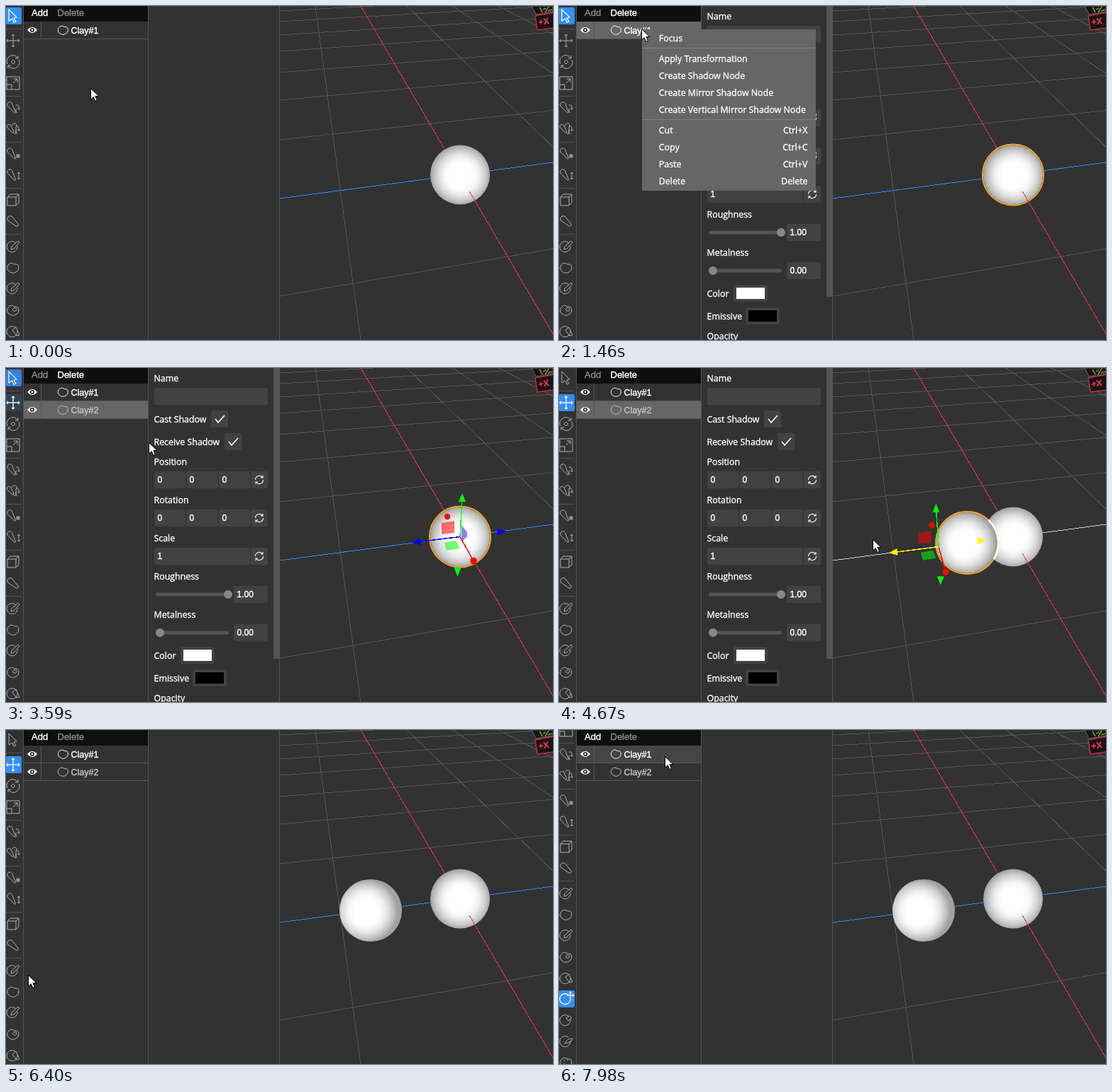
An HTML page that plays this animation: 771 px wide and 472 px high, repeating every 8 s.

```html
<!DOCTYPE html>
<html lang="en">
<head>
<meta charset="utf-8">
<title>Clay editor</title>
<style>
  html, body { margin: 0; width: 100%; height: 100%; overflow: hidden; background: #323232; }
  svg { display: block; width: 771px; height: 472px; }
  line { shape-rendering: crispEdges; }
  text { fill: #fff; font: 12.4px "Open Sans", "Noto Sans", sans-serif; stroke: #fff; stroke-width: .35; }
  .ui { font: 13px "Liberation Sans", Arial, sans-serif; stroke-width: .4; }
  .num { font: 12px "Liberation Sans", Arial, sans-serif; stroke-width: .4; }
  .dim { fill: #888; stroke: #888; }
  .soft { fill: #c4c4c4; stroke: #c4c4c4; }
  .line { fill: none; stroke: #b0b0b0; stroke-width: 1; }
  .white { fill: none; stroke: #fff; stroke-width: 1.1; }
</style>
</head>
<body>
<svg id="stage" viewBox="0 0 771 472"></svg>
<script>
const LOOP = 8000;
const stage = document.getElementById('stage');

// ---------- drawing helpers ----------
const rect = (x, y, w, h, fill, extra = '') =>
  `<rect x="${x}" y="${y}" width="${w}" height="${h}" fill="${fill}" ${extra}/>`;
const seg = (x1, y1, x2, y2, color, extra = '') =>
  `<line x1="${x1}" y1="${y1}" x2="${x2}" y2="${y2}" stroke="${color}" ${extra}/>`;
const text = (x, y, s, cls = '', extra = '') => `<text x="${x}" y="${y}" class="${cls}" ${extra}>${s}</text>`;
const path = (d, cls = 'line', extra = '') => `<path d="${d}" class="${cls}" ${extra}/>`;
const at = (x, y, body, extra = '') => `<g transform="translate(${x} ${y})" ${extra}>${body}</g>`;
const group = (id, body, extra = '') => `<g id="${id}" ${extra}>${body}</g>`;
const field = (x, y, w, value = '') =>
  rect(x, y, w, 24, '#424242', 'rx="2"') + text(x + 4.5, y + 16, value, 'num');

// ---------- toolbar ----------
const PIN = 'M-6.8-1.6A3.7 3.7 0 1 1-.8-4.6L3.6 6.6L2.2 7.4Z';
const DISC = 'M3.5-5.5A7.5 7.5 0 1 0 6-1';
const CLAY = 'M2-5Q-3-9-7-4Q-10 1-6 5Q-1 9 4 6Q8 4 8 0Q8-6 2-5Z';
const PEN = 'M-3 4L-2 0L7-8L9-6L1 3Z';
const MOVE = 'M-9 0H9M0-9V9M-7-2L-9 0L-7 2M7-2L9 0L7 2M-2-7L0-9L2-7M-2 7L0 9L2 7';
const TURN = 'M4-4Q9-5 8 2M6 .5L8 2.5L10 .5M6 7Q3 6 4 1';
const SHIFT = DISC + 'M6-10V0M1-5H11M4.5-8.5L6-10L7.5-8.5M9.5-6.5L11-5L9.5-3.5';
const ICONS = [
  [14, 'M-6-9L5 2L1 3L4 8L1 9L-1 4L-6 7Z'],
  [49, MOVE],
  [79, 'M-8 3A8.5 8.5 0 0 1 4-8L7-5M8-3A8.5 8.5 0 0 1-4 8L-7 5M7-9V-5H3M-7 9V5H-3M0-3L3 0L0 3L-3 0Z'],
  [109, 'M-9-9H9V9H-9ZM-9 2H-2V9M0 0L6-6M1-6H6V-1'],
  [144, PIN + TURN],
  [174, 'M-7-1A3 3 0 1 1-3-5L1 4Q0 6-2 4ZM-1-5A3 3 0 1 1 4-3L4 6Q2 8 1 5' + TURN],
  [209, PIN + 'M5 1H9V5H5ZM5 1L9 5M9 1L5 5'],
  [239, PIN + 'M8-4V6M6-2L8-4L10-2M6 4L8 6L10 4'],
  [274, 'M-8-4H4V8H-8ZM-8-4L-4-8H8V4L4 8M4-4L8-8'],
  [304, 'M-8-4Q-7-8-2-7L7 4Q8 8 4 7L-6 0Q-9-1-8-4Z'],
  [340, DISC + PEN],
  [370, CLAY],
  [399, DISC + PEN],
  [430, CLAY + 'M-1-1Q2-5 5-2Q5 2 1 1Z'],
  [460, DISC + 'M-1-2L4-6L9 5L5 6Z'],
  [489, SHIFT],
  [519, DISC + 'M0-3L5-6L8-3L3 1Z'],
  [549, DISC + 'M-2 3Q1-4 9-4Q8 2-2 3'],
  [579, CLAY + 'M-4-3H-2M1-4H3M-4 2H-2']
];
const button = (id, y) => rect(0, y - 12, 22, 24, '#3390ff', `rx="2" id="${id}"`);
const toolbar = group('tools',
  button('btnSelect', 14) + button('btnMove', 49) + button('btnShift', 489) +
  [32, 127, 192, 257, 322].map(y => seg(0, y + .5, 22, y + .5, '#555')).join('') +
  ICONS.map(([y, d]) => at(10, y, path(d))).join('') +
  group('litSelect', at(10, 14, path(ICONS[0][1], 'white'))) +
  group('litMove', at(10, 49, path(MOVE, 'white'))) +
  group('litShift', at(10, 489, path(SHIFT, 'white'))));

// ---------- node tree ----------
const eye = path('M-7 0Q0-8 7 0Q0 8-7 0Z', '', 'fill="#fff"') +
  '<circle r="3" fill="#222"/><circle r="1.4" fill="#fff"/>';
const row = (y, name, cls) =>
  at(37, y, eye) + at(80.5, y, path(CLAY, 'white',
    `transform="scale(.87)" ${cls ? 'style="stroke:#c4c4c4"' : ''}`)) +
  text(91.5, y + 4.5, name, 'ui ' + cls, 'style="font-size:12.5px"') +
  seg(49.5, y - 12, 49.5, y + 12, '#555') + seg(25, y + 12.5, 200, y + 12.5, '#555');
const tree =
  rect(25, 0, 175, 22, '#0f0f0f') +
  text(36, 14, 'Add', 'ui', 'id="add"') + text(72.5, 14, 'Delete', 'ui', 'id="del"') +
  rect(25, 22, 175, 24, '#454545', 'id="hover1"') +
  rect(25, 22, 175, 24, '#666', 'id="sel1"') + rect(25, 47, 175, 24, '#666', 'id="sel2"') +
  row(34, 'Clay#1', '') + group('row2', row(59, 'Clay#2', 'soft'));

// ---------- properties ----------
const reload = path('M-5.5 0A5.5 5.5 0 0 1 4.5-3.2M5.5 0A5.5 5.5 0 0 1-4.5 3.2M5-6V-3H2M-5 6V3H-2', 'white');
const reset = y => field(345, y, 24) + at(357, y + 12, reload);
const vector = y => [[209, 44], [254, 45], [300, 44]].map(([x, w]) => field(x, y, w, '0')).join('') + reset(y);
const check = (x, y) => field(x, y, 24) + path(`M${x + 6} ${y + 12}l4 5l9-10`, 'white', 'style="stroke-width:1.5"');
const slider = (y, knob, value) =>
  rect(211, y - 2.5, 103, 5, '#555', 'rx="2.5"') + `<circle cx="${knob}" cy="${y}" r="6" fill="#888"/>` +
  field(321, y - 12, 48, value);
const swatch = (x, y, color) => field(x, y, 48) + rect(x + 4, y + 4, 40, 16, color);
const labels = { Name: 14, 'Cast Shadow': 72, 'Receive Shadow': 104, Position: 132, Rotation: 186, Scale: 240,
  Roughness: 294, Metalness: 348, Color: 406, Emissive: 438, Opacity: 466 };
const props = group('props',
  Object.entries(labels).map(([s, y]) => text(208.5, y + 4.5, s)).join('') +
  field(209, 28, 160) + check(289, 60) + check(308, 92) + vector(146) + vector(200) +
  field(209, 254, 135, '1') + reset(254) + slider(320, 313, '1.00') + slider(374, 217, '0.00') +
  swatch(246, 394, '#fff') + swatch(263, 426, '#000') + rect(377, 0, 8, 411, '#555'));

// ---------- context menu ----------
const MENU = [[46, 'Focus'], [75, 'Apply Transformation'], [99, 'Create Shadow Node'],
  [123, 'Create Mirror Shadow Node'], [147, 'Create Vertical Mirror Shadow Node'],
  [176, 'Cut', 'Ctrl+X'], [200, 'Copy', 'Ctrl+C'], [224, 'Paste', 'Ctrl+V'], [248, 'Delete', 'Delete']];
const menu = group('menu',
  rect(117, 33, 245, 228, '#666') +
  [59.5, 160.5].map(y => seg(117, y, 362, y, '#808080')).join('') +
  MENU.map(([y, s, key]) => text(140.8, y + 4.2, s) +
    (key ? text(350.5, y + 4.2, key, '', 'text-anchor="end"') : '')).join(''));

// ---------- viewport ----------
const rows3d = [410, 189, 133, 94, 64, 41, 22, 7].map(y =>
  seg(386, y, 771, y + 385 * (-.1325 - .0003 * (y - 272)), '#555')).join('');
const cols3d = [0, 2, 3, 4, 5].map(n => {
  const k = .1356 + .449 * n;
  return seg(416.5 + 143.7 * k, 0, 416.5 + 615.7 * k, 472, '#555');
}).join('');
// Flat shading bands, darker toward the rim.
const BANDS = 11;
const ball = id => {
  let stops = '';
  for (let i = 0; i < BANDS; i++) {
    const from = i ? .4 + .6 * ((i - 1) / (BANDS - 1)) ** .85 : 0;
    const to = .4 + .6 * (i / (BANDS - 1)) ** .85;
    const v = Math.round(254 - 92 * (i / (BANDS - 1)) ** 1.5);
    stops += [from, to].map(o => `<stop offset="${o}" stop-color="rgb(${v},${v},${v})"/>`).join('');
  }
  return `<radialGradient id="${id}" cx=".51" cy=".51" r=".52">${stops}</radialGradient>`;
};
const cube =
  path('M741 0L747 12L771 8V0Z', '', 'fill="#141414" stroke="#666"') +
  path('M752 2L756 9M757 5L761 3M760 9L765 1M764 7L770 5', '', 'stroke="#7f9a1c" stroke-width="1.6"') +
  path('M746 14L772 9V31L749 34Z', '', 'fill="#151515" stroke="#d02c3c" stroke-width="1.4"') +
  at(751, 27, text(0, 0, '+X', 'num', 'transform="rotate(-8)" style="fill:#e5344a;stroke:#e5344a;font-weight:700"'));

const head = (id, color) => path('M6.5 0L-5.5-5V5Z', '', `id="${id}" fill="${color}"`);
const dot = (id, r) => `<circle id="${id}" r="${r}" fill="#f00"/>`;
const plane = (id, d, color) => path(d, '', `id="${id}" fill="${color}" opacity=".55"`);
const gizmo = group('gizmo',
  plane('planeX', 'M-9-7L9-10V7L-9 9Z', '#f00') + plane('planeY', 'M-11-4L6-7L11 4L-8 7Z', '#0f0') +
  plane('planeZ', 'M-4-12L4-2V4L-4 12Z', '#22f') +
  ['lineY', 'lineX', 'lineZ'].map((id, i) =>
    `<line id="${id}" stroke="${['#0f0', '#f00', '#00f'][i]}" stroke-width="1.5"/>`).join('') +
  dot('farX', 4.2) + dot('nearX', 4.8) + head('upY', '#0f0') + head('downY', '#0f0') +
  head('leftZ', '#00f') + head('rightZ', '#00f'));

const viewport = `<g clip-path="url(#view)">${rows3d}${cols3d}` +
  seg(500, 0, 771, 463.5, '#f0324b') + seg(386, 272, 771, 221, '#2b8cff', 'id="axisZ"') + cube +
  '<circle cx="640" cy="238.5" r="42" fill="url(#g1)"/><circle id="ball2" fill="url(#g2)"/>' +
  '<circle id="ring" fill="none" stroke="#f7a528" stroke-width="2"/>' +
  '<circle id="ringIn" fill="none" stroke="#fff" stroke-width="2.4" clip-path="url(#ball1)"/>' +
  seg(653.2, 262, 771, 463.5, '#f0324b') + gizmo + '</g>';

stage.innerHTML = `<defs>${ball('g1')}${ball('g2')}
  <clipPath id="view"><rect x="386" width="385" height="472"/></clipPath>
  <clipPath id="ball1"><circle cx="640" cy="238.5" r="42"/></clipPath></defs>` +
  rect(0, 0, 771, 472, '#323232') + viewport + toolbar + tree + props +
  [24.5, 200.5, 385.5].map(x => seg(x, 0, x, 472, '#555')).join('') + menu +
  group('cursor', path('M.5 .5V16L4.2 12.6L6.8 18.4L9.4 17.2L6.9 11.6H12Z', '', 'fill="#fff" stroke="#000"'));

const el = {};
stage.querySelectorAll('[id]').forEach(node => el[node.id] = node);

// ---------- motion ----------
const EASE = {
  io: u => u * u * (3 - 2 * u),
  in: u => u * u,
  out: u => 1 - (1 - u) * (1 - u)
};
// Keys: [time, values, ease into this key]
function track(keys, t) {
  let prev = keys[0];
  for (const key of keys) {
    if (t < key[0]) {
      if (key === prev) return key[1];
      const u = EASE[key[2] || 'io']((t - prev[0]) / (key[0] - prev[0]));
      return prev[1].map((v, i) => v + (key[1][i] - v) * u);
    }
    prev = key;
  }
  return prev[1];
}
const CURSOR = [
  [310, [119, 116]], [600, [116, 32]], [1760, [116, 32]], [2210, [199, 119]], [2600, [199, 119]],
  [3330, [7, 45]], [3420, [7, 45]], [3590, [200, 104], 'in'], [4110, [577, 243], 'out'], [4210, [577, 243]],
  [4670, [442, 242]], [4800, [431, 246], 'out'], [5010, [434, 249]], [5240, [452, 250]], [5300, [453, 250]],
  [5850, [106, 209]], [5900, [100, 209]], [6160, [100, 209]], [6400, [31, 346]], [6520, [13, 370], 'out'],
  [7030, [13, 370]], [7210, [17, 375]], [7520, [17, 375]], [7900, [152, 38]], [7980, [149, 37]]
];
const GIZMO = [[4210, [0]], [4670, [.83]], [4850, [1.06], 'out'], [5050, [1.06]], [5240, [1.016]], [5310, [1]]];
const BALL = [[4250, [0]], [4670, [.51], 'in'], [4930, [1.05], 'out'], [5090, [1.05]], [5240, [1.02]], [5310, [1]]];
const SCROLL = [[6560, [0]], [6900, [109]]];
const fade = (t, from, to) => Math.min(1, Math.max(0, (t - from) / (to - from)));

const set = (id, attrs) => { for (const k in attrs) el[id].setAttribute(k, attrs[k]); };
const show = (id, amount) => set(id, { opacity: Number(amount) });

// Offsets from the gizmo centre at the start and the end of the drag: x0, y0, x1, y1, angle
const HANDLES = {
  planeX: [-17, -12.5, -20, -13, 0], planeY: [-11.5, 12.5, -15, 12, 0], planeZ: [6, -4.5, 6, -4.5, 0],
  farX: [-18, -28.5, -8, -31, 0], nearX: [19, 34, 8, 36, 0],
  upY: [3, -55, -5, -54, -90], downY: [-3.5, 49.5, 4, 47, 90],
  leftZ: [-62, 7.5, -64, 8, 173], rightZ: [58, -7.5, 61, -9, -7]
};
const LINES = { lineY: 'upY', lineX: 'nearX', lineZ: 'leftZ' };

const isSelected = t => t >= 790 && t < 6160;

function renderScene(t) {
  const selected = isSelected(t);
  const [s] = track(BALL, t), [g] = track(GIZMO, t);
  const pos = { cx: 640 - 126 * s, cy: 238.5 + 16.5 * s };
  const r = 42 + 2 * s;
  set('ball2', { ...pos, r });
  show('ball2', s > 0);
  set('g2', { cx: .51 - .09 * s });
  set('ring', { ...pos, r: r + 1 });
  set('ringIn', { ...pos, r: r + 1 });
  show('ring', selected);
  show('ringIn', selected && s > .05);

  const active = t >= 4080 && t < 5340;
  const zColor = active ? '#ffff00' : '#0000ff';
  const gx = 640 - 126 * g, gy = 238.5 + 17 * g;
  show('gizmo', t >= 3450 && t < 6160);
  const spot = id => {
    const [x0, y0, x1, y1] = HANDLES[id];
    return [gx + x0 + (x1 - x0) * g, gy + y0 + (y1 - y0) * g];
  };
  for (const id in HANDLES) {
    const [x, y] = spot(id);
    set(id, { transform: `translate(${x} ${y}) rotate(${HANDLES[id][4]})` });
  }
  for (const id in LINES) {
    const [x2, y2] = spot(LINES[id]);
    set(id, { x1: gx, y1: gy, x2, y2 });
  }
  set('lineZ', { stroke: zColor });
  set('leftZ', { fill: zColor });
  set('rightZ', { fill: zColor });
  set('planeZ', { opacity: .55 * Math.max(0, 1 - g * 1.5) });
  set('axisZ', { stroke: active ? '#b4d6fb' : '#2b8cff' });
}

function renderPanels(t) {
  const selected = isSelected(t);
  const second = t >= 2580;
  el.add.classList.toggle('dim', selected);
  el.del.classList.toggle('dim', !selected);
  show('props', selected);
  show('menu', t >= 1460 && t < 2580);
  show('row2', second);
  show('sel1', second ? 0 : fade(t, 780, 890));
  show('sel2', second && selected);
  show('hover1', fade(t, 7880, 7960));

  const [scroll] = track(SCROLL, t);
  set('tools', { transform: `translate(0 ${-scroll})` });
  const select = 1 - fade(t, 3560, 3760);
  const shift = fade(t, 7030, 7210);
  show('btnSelect', select);
  show('litSelect', select);
  show('btnMove', fade(t, 3560, 3760));
  show('litMove', t >= 3330);
  show('btnShift', shift);
  show('litShift', shift);
}

function render(t) {
  renderScene(t);
  renderPanels(t);
  const [x, y] = track(CURSOR, t).map(Math.round);
  set('cursor', { transform: `translate(${x} ${y})` });
}

const start = performance.now();
function tick(now) {
  render(Math.max(0, now - start) % LOOP);
  requestAnimationFrame(tick);
}
render(0);
requestAnimationFrame(tick);
</script>
</body>
</html>
```
